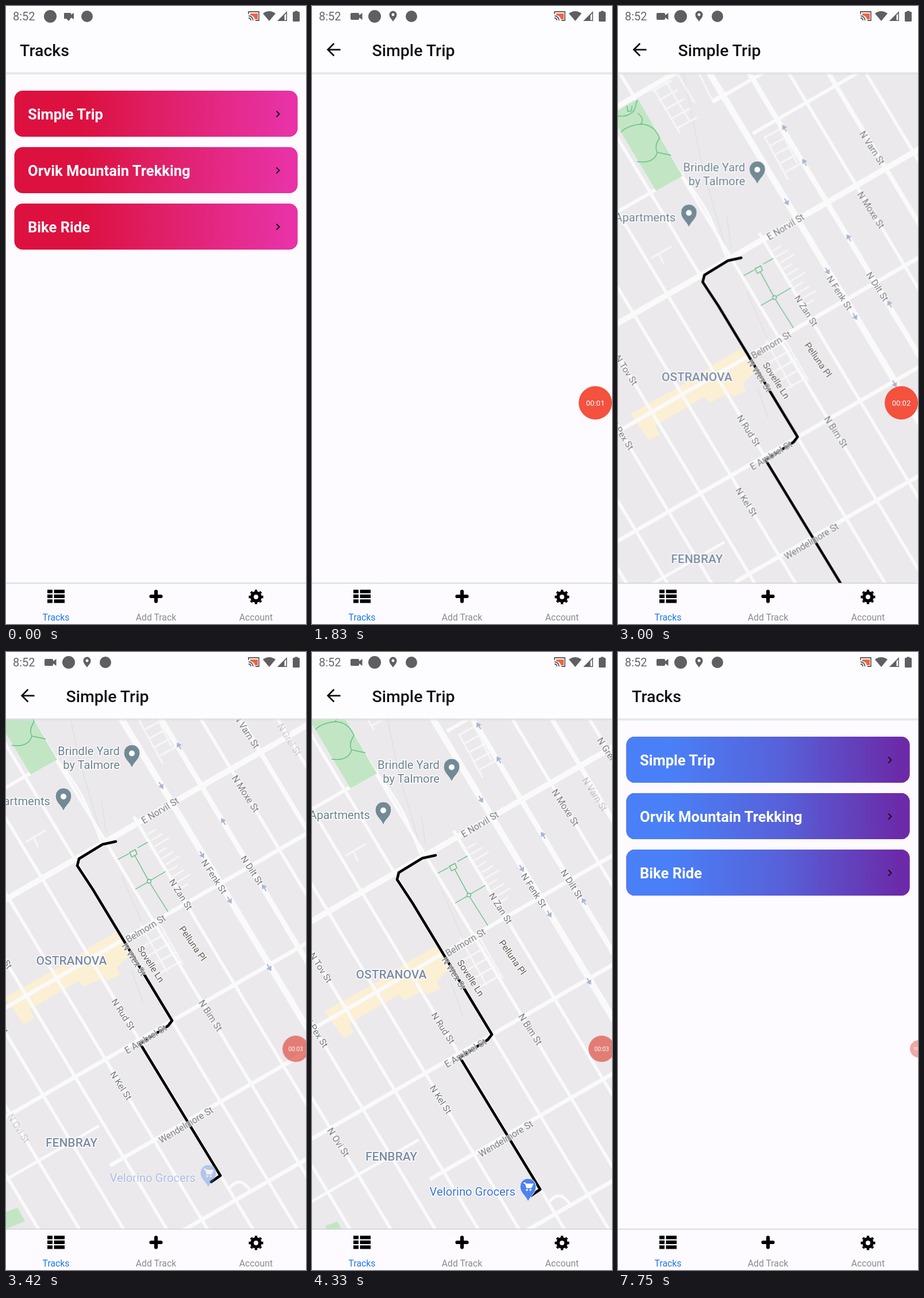
An HTML page for the animation above (8 s loop, 522x1073 px).

```html
<!DOCTYPE html>
<html lang="en">
<head>
<meta charset="utf-8">
<title>Tracks</title>
<style>
html,body{margin:0;width:100%;height:100%;overflow:hidden;background:#fdfbff}
svg{display:block;width:100vw;height:100vh;font-family:Roboto,"Open Sans",sans-serif}
.title{font-size:28.5px;font-weight:500;fill:#111114}
.card{font-size:25.6px;font-weight:700;fill:#fff}
.tab{font-size:15.8px;text-anchor:middle;fill:#8b8b90}
.on{fill:#1977ee}
.clock{font-size:20px;fill:#66666a}
.timer{font-size:13px;text-anchor:middle;fill:#fff}

.label{paint-order:stroke;stroke:#fff;stroke-linejoin:round}
.street{font-size:15.8px;fill:#777679;stroke-width:2.5px;stroke-opacity:.75;text-anchor:middle}
.lane{fill:#5f5b56}
.place{font-size:20.2px;fill:#6a828d;stroke-width:3px;text-anchor:end}
.area{font-size:21px;font-weight:500;fill:#7b8ba3;stroke-width:3px;text-anchor:middle}
.shop{fill:#3a73d8}
.road{fill:none;stroke:#fafafb;stroke-linejoin:round}
.path{fill:none;stroke:#5fbd80;stroke-width:1.4px}

/* every part shares one 8 s clock and holds between keys unless stepped */
.a{animation:8s step-end infinite}
.before{animation-name:before}
.after{animation-name:after}
.blue{animation-name:blue}
.detail{animation-name:detail;transform-origin:261px 540px}
.map{animation-name:map}
.pan{animation-name:pan}
.pois{animation-name:pois}
.faint{animation-name:faint}
.streets{animation-name:streets}
.late{animation-name:late}
.old{animation-name:old}
.new{animation-name:new}
.bubble{animation-name:bubble}
.digits{animation-name:digits}
@keyframes before{0%{opacity:1}1%{opacity:0}}
@keyframes after{0%{opacity:0}1%{opacity:1}}
@keyframes blue{0%{opacity:0}50%{opacity:1}}
@keyframes detail{
  0%{opacity:0;transform:scale(.92)}
  16.6%{opacity:0;transform:scale(.92);animation-timing-function:steps(3)}
  19.7%{opacity:1;transform:none}
  90.55%{opacity:0;transform:none}
}
@keyframes map{0%{opacity:0}24.9%{opacity:0;animation-timing-function:steps(5)}30.1%{opacity:1}}
@keyframes pan{
  0%{transform:translate(46px,292.4px)}
  31.25%{transform:translate(46px,292.4px);animation-timing-function:steps(9)}
  40.56%{transform:translate(-24px,-32px)}
  45.8%{transform:translate(-24px,-32px);animation-timing-function:steps(8)}
  54%{transform:translate(0,-8px);animation-timing-function:steps(4)}
  58.3%{transform:none}
}
@keyframes pois{0%{opacity:0}28%{opacity:.35}30.1%{opacity:.7}32.2%{opacity:1}}
@keyframes faint{0%{opacity:0}30.1%{opacity:.35}32.2%{opacity:1}}
@keyframes streets{0%{opacity:0}33.3%{opacity:0;animation-timing-function:steps(4)}37.5%{opacity:1}}
@keyframes late{0%{opacity:0}41.5%{opacity:.35}44.7%{opacity:1}}
@keyframes old{0%{opacity:1}50%{opacity:1;animation-timing-function:steps(3)}53%{opacity:0}}
@keyframes new{0%{opacity:0}53%{opacity:.45}55.2%{opacity:1}}
@keyframes bubble{
  0%{opacity:1;color:#f4513f;transform:translate(62px,0)}
  9.35%{opacity:1;color:#f4513f;transform:translate(62px,0);animation-timing-function:steps(4)}
  13.45%{opacity:1;color:#f4513f;transform:none}
  41.6%{opacity:.7;color:#de4f44;transform:translate(11px,0) scale(.79)}
  75.9%{opacity:.6;color:#de4f44;transform:translate(30px,0) scale(.52)}
  90.55%{opacity:.48;color:#de4f44;transform:translate(30px,0) scale(.52)}
}
@keyframes digits{
  0%{transform:none}
  17.6%{transform:translate(0,-60px)}
  31.2%{transform:translate(0,-120px)}
  41.6%{transform:translate(0,-180px)}
}
</style>
</head>
<body>
<svg viewBox="0 0 522 1073">
<defs>
  <linearGradient id="red"><stop offset=".24" stop-color="#dc1140"/><stop offset=".58" stop-color="#e12270"/><stop offset=".96" stop-color="#e832a6"/></linearGradient>
  <linearGradient id="blue"><stop offset=".15" stop-color="#4a80f7"/><stop offset=".55" stop-color="#5761d9"/><stop offset=".96" stop-color="#6b2ba9"/></linearGradient>
  <linearGradient id="shade" x2="0" y2="1"><stop stop-color="#dcdcdf"/><stop offset="1" stop-color="#dcdcdf" stop-opacity="0"/></linearGradient>
  <clipPath id="mapBox"><rect y="116" width="522" height="886"/></clipPath>
  <clipPath id="disc"><circle r="29"/></clipPath>
  <path id="pin" d="M0 20C-3 9-14 5-14-7a14 14 0 0 1 28 0C14 5 3 9 0 20Z"/>
  <g id="bar"><rect width="522" height="116" fill="#fdfcff"/><rect y="115.500" width="522" height="5" fill="url(#shade)"/></g>
</defs>

<rect width="522" height="1073" fill="#fdfbff"/>
<g id="list">
  <use href="#bar"/>
  <text class="title" x="24" y="87">Tracks</text>
  <g id="cards"></g>
</g>

<g class="a detail">
  <rect width="522" height="1002" fill="#fdfbff"/>
  <g clip-path="url(#mapBox)"><g class="a map">
    <rect y="116" width="522" height="886" fill="#ebe9ec"/>
    <g class="a pan">
      <path fill="#fbf0d4" d="M22 632 145 563 167 546 220 516 238 543 241 556 217 580 223 592 200 603 195 596 160 613 150 603 65 653 73 668 55 678Z"/>
      <path fill="none" stroke="#dfe0e4" stroke-width="1.500" d="M110 18 150 215 190 350M190 290 198 345M225 420 260 500M243 585 262 640"/>
      <g id="roads"></g>
      <g fill="#c2e6c4">
        <path d="M-12 113 35 85 113 219 67 245Z"/>
        <path d="M24 1004 44 997 57 1020 24 1034Z"/>
        <path d="M335-176h18l-10 11Z"/>
      </g>
      <g class="path">
        <path transform="translate(-45 -292)" d="M33 405Q62 412 74 397L79 379M61 389l2 10 6-1 1-9M80 402Q93 412 85 421 60 424 51 435M85 421Q108 421 118 445 108 460 114 470L138 475M114 470Q108 490 79 486"/>
        <path d="M219 392 238 382M253 372 271 362M239 380 249 375 252 383 243 388ZM248 385 271 427M275 434 306 483M249 444 270 432M276 428 302 413"/>
        <circle cx="273" cy="430" r="3.300"/>
      </g>
      <g id="arrows" class="a streets" fill="#a9b4d0"></g>
      <path fill="none" stroke="#000" stroke-width="4.600" stroke-linecap="round" stroke-linejoin="round" d="M215 361 192 366 151 391 148 403 175 444 313 672 306 681 257.500 712 397 941 381 952"/>
      <g id="labels"></g>
    </g>
  </g></g>
  <use href="#bar"/>
  <path fill="none" stroke="#111" stroke-width="2.800" d="M49.500 75.800H28M38.300 65 27.600 75.800 38.300 86.500"/>
  <text class="title" x="104.500" y="87">Simple Trip</text>
</g>

<g id="tabs">
  <rect y="1002" width="522" height="71" fill="#fdfbff"/>
  <rect y="1001.500" width="522" height="1.200" fill="#c8c8cb"/>
  <path d="M72 1016.500h9M83.500 1016.500h18.500M72 1024.900h9M83.500 1024.900h18.500M72 1033.300h9M83.500 1033.300h18.500" stroke="#000" stroke-width="6.200"/>
  <path d="M252.500 1025h17M261 1016.500v17" stroke="#000" stroke-width="6.200" stroke-linecap="round"/>
  <g fill="none" stroke="#000" transform="translate(435 1026)">
    <circle r="7" stroke-width="6"/>
    <circle r="10.500" stroke-width="4.200" pathLength="8" stroke-dasharray=".5 .5" stroke-dashoffset=".25"/>
  </g>
  <text class="tab on" x="87" y="1067">Tracks</text>
  <text class="tab" x="261" y="1067">Add Track</text>
  <text class="tab" x="435" y="1067">Account</text>
</g>

<g fill="#5f5f63">
  <text class="clock" x="12" y="25">8:52</text>
  <g class="a before">
    <circle cx="77" cy="18" r="11"/>
    <path d="M101 12h12v3l5-3v11l-5-3v1l-4 5-4-4h-4Z"/>
    <circle cx="141" cy="18" r="10"/>
  </g>
  <g class="a after">
    <path d="M69 12h11q2 0 2 2v2l5.500-4v12l-5.500-4v2q0 2-2 2H69q-2 0-2-2v-8q0-2 2-2Z"/>
    <circle cx="109" cy="18" r="11"/>
    <path fill-rule="evenodd" d="M141 27c-2-4-6.500-7-6.500-12a6.500 6.500 0 0 1 13 0c0 5-4.500 8-6.500 12ZM141 12.500a2.500 2.500 0 1 0 .01 0Z"/>
    <circle cx="173" cy="18" r="10"/>
  </g>
  <path d="M425 13h13v10h-5q-1-6-8-7Z" fill="#f1633f"/>
  <path d="M422 14v-4h18v15h-6M422 17q7 1 8 8M422 21q4 0 4 4" fill="none" stroke="#5f5f63" stroke-width="1.800"/>
  <path d="M447 13q11-8 22 0L458 26Z"/>
  <path d="M472 26 489 9v17Z"/>
  <path d="M484.500 16 487.500 13V24.500h-3Z" fill="#fdfbff"/>
  <path d="M502.500 8.500h5V10h2q1.500 0 1.500 1.500v14q0 1.500-1.500 1.500h-9q-1.500 0-1.500-1.500v-14q0-1.500 1.500-1.500h2Z"/>
</g>

<g transform="translate(493 689)"><g class="a bubble">
  <circle r="29" fill="currentColor"/>
  <g clip-path="url(#disc)"><g class="a digits timer" id="digits"></g></g>
</g></g>
</svg>

<script>
const put = (id, html) => document.getElementById(id).innerHTML = html;

// list cards
put('cards', ['Simple Trip', 'Orvik Mountain Trekking', 'Bike Ride'].map((name, i) => {
  const box = `<rect x="14.500" width="493" height="80" rx="14.500" `;
  return `<g transform="translate(0 ${147 + 98 * i})">
    ${box}fill="url(#red)"/>${box}class="a blue" fill="url(#blue)"/>
    <text class="card" x="38" y="49.500">${name}</text>
    <path d="M470.500 35.500 475.500 40.500 470.500 45.500" fill="none" stroke="#151018" stroke-width="2"/></g>`;
}).join(''));

put('digits', [0, 1, 2, 3].map(n => `<text y="${60 * n + 4.5}">00:0${n}</text>`).join(''));

// roads: avenues run down to the right, cross streets up to the right
const avenueX = (x, y) => x + (y - 560) / 1.66;
const road = (d, w, alpha = 1) =>
  `<path class="road" d="${d}" stroke-width="${w}" stroke-opacity="${alpha}"/>`;
const avenue = ([x, top, w = 5.5]) =>
  road(`M${avenueX(x, top)} ${top}L${avenueX(x, 1110)} 1110`, w);
const cross = ([x1, x2, y0, w = 6]) =>
  road(`M${x1} ${y0 - .577 * x1}L${x2} ${y0 - .577 * x2}`, w);

const avenues = [[-205, 500], [-134, 400], [-57, 300], [18, 200], [89, 150], [168, 100],
  [245, 40], [317, 8], [392, 318], [473, -200, 11], [542, -150, 9], [611, -160],
  [680, -82, 8], [745, -200]];
const streets = [[-60, 600, 475, 10], [-60, 600, 663, 7], [-60, 600, 853, 7],
  [205, 600, 1042, 7], [-60, 186, 962, 5], [300, 600, 1228, 7], [-60, 115, 281],
  [235, 600, 281], [165, 600, 186], [-60, 600, 98, 9], [115, 600, 32], [90, 600, -28]];

let alleys = '';
const alley = (x, y, dx, dy) => alleys += `M${x} ${y}l${dx} ${dy}`;
for (let i = 0; i < 10; i++) alley(270 + i * 6.2, 349 + i * 10.5, 15 + i % 3 * 5, -9 - i % 3 * 3);
for (let i = 0; i < 5; i++) {
  alley(256 + i * 9, 152 + i * 15, 27, -15);
  alley(60 + i * 11, 72 + i * 16, 34, -19);
  alley(252 + i * 9, 528 + i * 16, 42, -24);
}
alley(255, 150, 42, 76); alley(281, 134, 31, 62);
alley(62, 66, 46, 78); alley(84, 55, 42, 70); alley(104, 42, 30, 50);
alley(258, 505, 46, 82); alley(292, 505, 40, 70);
alley(58, 362, 36, -21); alley(72, 354, 8, 17); alley(135, 28, 30, 60);

put('roads', road(alleys, 3.2, .75) + road('M412 964Q430 939 449 967M165 88 190 74', 5) +
  road('M285-190 293-82', 14) + road('M113 219Q150 265 165 300L190 362', 4) +
  avenues.map(avenue).join('') + streets.map(cross).join(''));

const arrow = (x, y, turn) =>
  `<path transform="translate(${x} ${y}) rotate(${turn})" d="M-7-1h6v-4L7 0-1 5V1h-6Z"/>`;
put('arrows', [[294, 264], [365, 384], [413, 463], [482, 580]].map(p => arrow(...p, 59)).join('') +
  [[290, 136], [325, 195], [402, 326], [473, 441]].map(p => arrow(...p, 239)).join(''));

// labels and pins
const text = (kind, s, x, y, turn = 0) =>
  `<text class="label ${kind}" transform="translate(${x} ${y}) rotate(${turn})" dy=".35em">${s}</text>`;
const group = (kind, html) => `<g class="a ${kind}">${html}</g>`;
const pin = (x, y, inner = '<circle cy="-6" r="5" fill="#fff"/>', color = '#738a96') =>
  `<g transform="translate(${x} ${y})"><use href="#pin" fill="${color}" stroke="#f6f7f9" stroke-width="1"/>${inner}</g>`;
const down = (s, x, y) => text('street', s, x, y, 57);
const up = (s, x, y) => text('street', s, x, y, -31);

const names = [['N Pex St', 8, 668], ['N Tov St', 15, 556], ['N Kel St', 224, 785],
  ['N Rud St', 228, 661], ['N Wex St', 247, 566], ['N Bim St', 380, 663], ['N Zan St', 328, 453],
  ['N Fenk St', 386, 422], ['N Dilt St', 452, 411], ['N Moxe St', 441, 278]];
const crossNames = [['E Norvil St', 292, 307], ['Belmorn St', 267, 512],
  ['E Ambrel St', 267, 704], ['Wendelmore St', 337, 853]];
const cart = '<path d="M-8-13h3l3 8H5L8-11H-4" fill="none" stroke="#fff" stroke-width="2"/><path d="M-4-11H8L5-5h-7Z" fill="#fff"/><circle cx="-2" cy="-1" r="1.700" fill="#fff"/><circle cx="4" cy="-1" r="1.700" fill="#fff"/>';

put('labels',
  group('streets', names.map(n => down(...n)).join('') + crossNames.map(n => up(...n)).join('') +
    text('street lane', 'Sovelle Ln', 276, 574, 57) + text('street lane', 'Pelluna Pl', 349, 538, 55) +
    text('place', 'Apartments', 101, 291) +
    group('old', down('N Varn St', 443, 170))) +
  group('new', down('N Varn St', 492, 255)) +
  group('pois',
    text('area', 'OSTRANOVA', 138, 568) + text('area', 'FENBRAY', 138, 884) +
    text('place', 'Brindle Yard', 222, 204) + text('place', 'by Talmore', 222, 228) +
    text('place', 'V&amp;J Bulk Wholesale', 318, 6) +
    pin(243, 214) + pin(340, 4)) +
  group('faint', pin(124, 289) + pin(-37, -32)) +
  group('late', down('N Grel St', 517, 184) + down('N Ovi St', 46, 859) +
    text('place shop', 'Velorino Grocers', 354, 945) + pin(376, 943, cart, '#4c83ee')));
</script>
</body>
</html>
```
